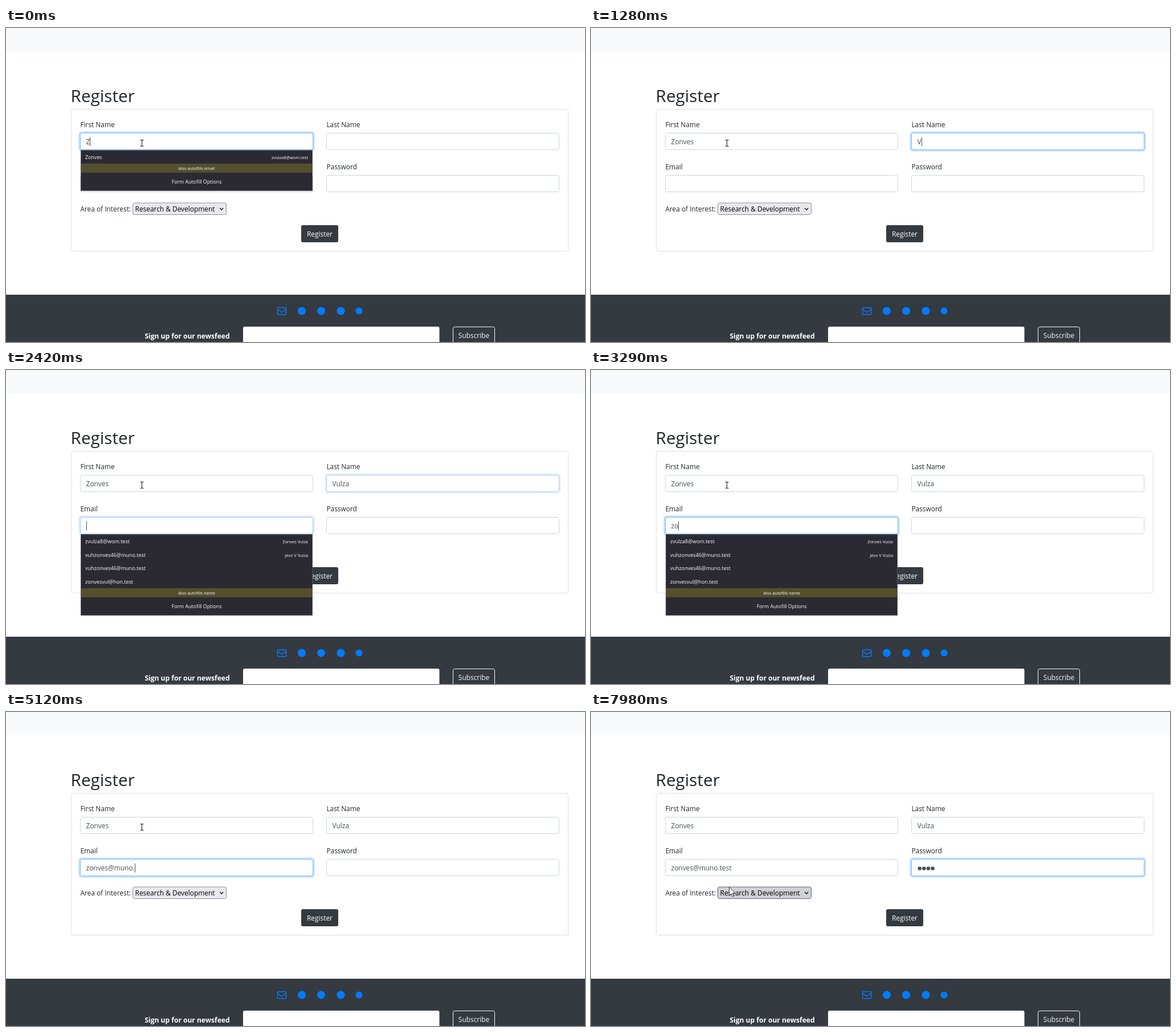
These frames come from a looping animation (1016x551 px, 8 s). An HTML page:

```html
<!DOCTYPE html>
<html lang="en">
<head>
<meta charset="utf-8">
<title>Register</title>
<style>
  html, body { margin: 0; width: 100%; height: 100%; overflow: hidden; background: #fff; }
  svg { display: block; width: 1016px; height: 551px; }
  text { font-family: "Open Sans", "Noto Sans", sans-serif; font-size: 11.9px; fill: #212529; }
</style>
</head>
<body>
<svg id="stage" viewBox="0 0 1016 551"></svg>
<script>
const LOOP = 8000, STEP = 70, FADE = 150, BLINK = 540;
const stage = document.getElementById('stage');

function add(parent, tag, attrs, content) {
  const el = document.createElementNS('http://www.w3.org/2000/svg', tag);
  for (const key in attrs) el.setAttribute(key, attrs[key]);
  if (content !== undefined) el.textContent = content;
  parent.appendChild(el);
  return el;
}
const group = (parent = stage) => add(parent, 'g', {});
const box = (parent, x, y, width, height, fill, more) =>
  add(parent, 'rect', { x, y, width, height, fill, ...more });
const label = (parent, x, y, str, style = '', anchor = 'start') =>
  add(parent, 'text', { x, y, style, 'text-anchor': anchor }, str);
const path = (parent, d, attrs) => add(parent, 'path', { d, fill: 'none', ...attrs });
const show = (el, on) => el.setAttribute('visibility', on ? 'visible' : 'hidden');

// Page
box(stage, 0, 0, 1016, 41, '#f8f9fa');
label(stage, 113.6, 130, 'Register', 'font-size:29.7px');
box(stage, 114.5, 142.5, 872, 249, '#fff', { rx: 3, stroke: '#dfdfdf' });
label(stage, 130.4, 322, 'Area of Interest:');
const select = box(stage, 222.5, 307, 164, 20.5, '#e9e9ed', { rx: 3, stroke: '#8f8f9d' });
label(stage, 226.6, 322, 'Research & Development', 'fill:#000');
path(stage, 'M375.2 316l3 3 3-3', { stroke: '#111', 'stroke-width': 1.3 });
box(stage, 518, 346, 65, 30, '#343a40', { rx: 3 });
label(stage, 550.5, 366, 'Register', 'fill:#fff', 'middle');

// Footer
box(stage, 0, 468, 1016, 83, '#343a40');
box(stage, 476.5, 490.7, 15, 12, 'none', { rx: 1.5, stroke: '#007bff', 'stroke-width': 1.5 });
path(stage, 'M476.6 493.5l6 4.6q1.4 1 2.8 0l6-4.6', { stroke: '#007bff', 'stroke-width': 1.5 });
for (const [cx, r] of [[519, 7], [553, 7], [587.5, 7], [619.5, 6]])
  add(stage, 'circle', { cx, cy: 496.5, r, fill: '#007bff' });
label(stage, 318, 545, 'Sign up for our newsfeed', 'font-size:12.05px;font-weight:700;fill:#fff', 'middle');
box(stage, 416, 524, 344.5, 40, '#fff', { rx: 3 });
box(stage, 784.5, 524.5, 73, 40, 'none', { rx: 3, stroke: '#f8f9fa' });
label(stage, 821, 544, 'Subscribe', 'fill:#f8f9fa', 'middle');

// Form fields: one key time per typed character, focus from start to end
const fields = [
  { name: 'First Name', x: 130.5, y: 184.5, value: 'Zonves', start: -1000, end: 870,
    keys: [0, 130, 200, 400, 470, 670] },
  { name: 'Last Name', x: 562.5, y: 184.5, value: 'Vulza', start: 870, end: 2350,
    keys: [1280, 1610, 1680, 1940, 2010] },
  { name: 'Email', x: 130.5, y: 258.5, value: 'zonves@muno.test', start: 2350, end: 6090,
    keys: [3090, 3290, 3430, 3630, 3700, 3900, 4230, 4500, 4640, 4840, 5040, 5110, 5240, 5380, 5450, 5560] },
  { name: 'Password', x: 562.5, y: 258.5, secret: true, start: 6090, end: 9000,
    keys: [6650, 6850, 7170, 7440] }
];

for (const f of fields) {
  const { x, y } = f;
  label(stage, x - 0.1, y - 10.5, f.name);
  box(stage, x, y, 408, 29, '#fff', { rx: 3, stroke: '#ced4da' });
  f.glow = group();
  box(f.glow, x - 1.8, y - 1.8, 411.6, 32.6, 'none',
    { rx: 4.5, stroke: '#007bff', 'stroke-opacity': 0.25, 'stroke-width': 2.6 });
  box(f.glow, x, y, 408, 29, 'none', { rx: 3, stroke: '#80bdff' });
  if (f.secret) {
    f.dots = f.keys.map((_, i) => add(stage, 'circle',
      { cx: x + 14.2 + i * 7.6, cy: y + 16, r: 3.3, fill: '#495057' }));
  } else {
    f.text = label(stage, x + 10.1, y + 19.5, '', 'fill:#495057');
  }
}
const caret = box(stage, 0, 0, 1, 16, '#495057');

// Autofill popups
function popup(x, y, rows, note, from, to) {
  const el = group(), rowH = 23.65, mid = x + 203.5;
  const noteY = y + rows.length * rowH;
  box(el, x, y, 407, noteY + 47.8 - y, '#2b2a33');
  rows.forEach(([main, side = '', size = 8.8], i) => {
    const base = y + i * rowH + 15.8;
    label(el, x + 8, base, main, `font-size:${size}px;fill:#fbfbfe`);
    label(el, x + 399, base, side, 'font-size:7.4px;fill:#fbfbfe', 'end');
  });
  box(el, x, noteY, 407, 15.8, '#54502e');
  label(el, mid, noteY + 10.7, note, 'font-size:7.3px;fill:#fbfbfe', 'middle');
  label(el, mid, noteY + 35, 'Form Autofill Options', 'font-size:8.8px;fill:#fbfbfe', 'middle');
  box(el, x + 0.5, y + 0.5, 406, noteY + 46.8 - y, 'none', { stroke: '#5b5b66', 'stroke-width': 0.8 });
  return { el, from, to };
}
const mailA = 'zvulza8@wom.test', mailB = 'vuhzonves46@muno.test', mailC = 'zonvesvul@hon.test';
const popups = [
  popup(131, 214.3, [['Zonves', mailA]], 'Also autofills email', 0, 870),
  popup(563, 214.3, [['Vulza', mailA], ['Vulza', mailB], ['Vulza']], 'Also autofills email', 1350, 2350),
  popup(131, 288.3, [[mailA, 'Zonves Vulza', 9], [mailB, 'Jevo V Vulza', 9], [mailB, '', 9], [mailC, '', 9]],
    'Also autofills name', 2420, 3360),
  popup(131, 288.3, [[mailC, '', 9]], 'Autofills email', 3360, 4300)
];

// Mouse
const beam = group();
const beamShape = 'M-3 -5.5h2l1 1 1-1h2M0 -4.5v9M-3 5.5h2l1-1 1 1h2';
path(beam, beamShape, { stroke: '#fff', 'stroke-width': 2.4 });
path(beam, beamShape, { stroke: '#222', 'stroke-width': 1.1 });
const arrow = path(stage, 'M0 0v15l3.5-3.3 2.4 5.5 2.3-1-2.4-5.3h5z',
  { fill: '#fff', stroke: '#222', 'stroke-width': 0.9 });
const moves = [
  { at: 0, x: 238.5, y: 202, text: true },
  { at: 7640, x: 232, y: 218 },
  { at: 7710, x: 205, y: 280, text: true },
  { at: 7780, x: 182, y: 350 },
  { at: 7910, x: 214, y: 337 },
  { at: 7980, x: 242.5, y: 307, hover: true }
];

function fade(since) {
  if (since < 0) return 0;
  const p = Math.min(1, (Math.floor(since / STEP) * STEP + 10) / FADE);
  return p * p * (3 - 2 * p);
}

function draw(t) {
  for (const f of fields) {
    const count = f.keys.filter(k => k <= t).length;
    f.glow.setAttribute('opacity', fade(t - f.start) * (1 - fade(t - f.end)));
    if (f.secret) f.dots.forEach((dot, i) => show(dot, i < count));
    else f.text.textContent = f.value.slice(0, count);

    if (t >= f.start && t < f.end) {
      const width = f.secret ? count * 7.7 : count && f.text.getComputedTextLength();
      const last = count ? f.keys[count - 1] : f.start;
      caret.setAttribute('x', Math.round(f.x + 10 + width));
      caret.setAttribute('y', f.y + 7);
      show(caret, Math.floor((t - last) / BLINK) % 2 === 0);
    }
  }
  for (const p of popups) show(p.el, t >= p.from && t < p.to);

  const m = moves.filter(p => p.at <= t).pop();
  for (const el of [beam, arrow]) el.setAttribute('transform', `translate(${m.x} ${m.y})`);
  show(beam, m.text);
  show(arrow, !m.text);
  select.setAttribute('fill', m.hover ? '#d0d0d7' : '#e9e9ed');
  select.setAttribute('stroke', m.hover ? '#676774' : '#8f8f9d');
}

const begin = performance.now();
function tick() {
  draw((performance.now() - begin) % LOOP);
  requestAnimationFrame(tick);
}
tick();
</script>
</body>
</html>
```
